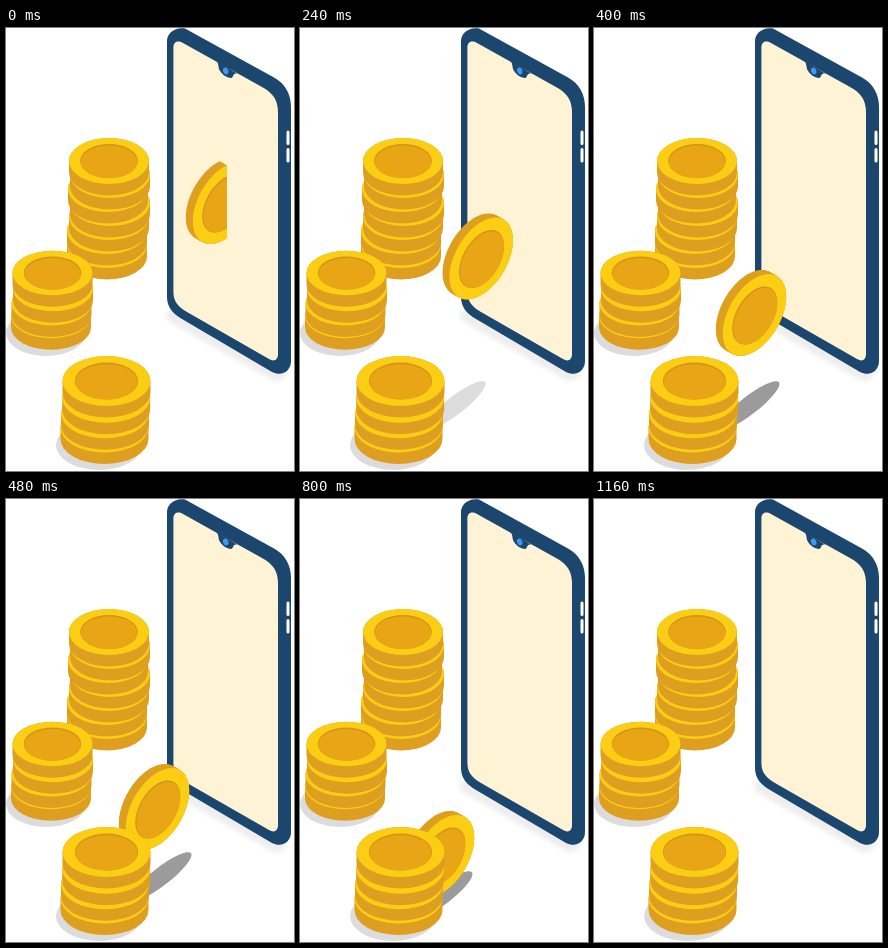
An HTML page with a canvas that plays this animation: 288 px wide and 443 px high, repeating every 2.2 s.

```html
<!DOCTYPE html>
<html lang="en">
<head>
<meta charset="utf-8">
<title>Coins from a phone</title>
<style>
  html, body { margin: 0; width: 100%; height: 100%; overflow: hidden; background: #fff; }
  canvas { display: block; width: 288px; height: 443px; }
</style>
</head>
<body>
<canvas id="stage" width="288" height="443"></canvas>
<script>
const ctx = document.getElementById('stage').getContext('2d');
const W = 288, H = 443, LOOP = 2200, STEP = 40, LAND = 560, END = 1160;
const YELLOW = '#fbce14', SIDE = '#de9f20', INNER = '#e8a516', RIM = '#d3931b';
const NAVY = '#1b466e', CREAM = '#fff3d6';
const SLOT = 221;   // the coin is hidden to the right of this line
const R = 36.6;     // radius of the moving coin

// time, x, y while the coin drops out of the screen
const FALL = [[0, 218.5, 175], [160, 193, 197], [320, 169.5, 264], [480, 151.5, 310], [LAND, 155.5, 343]];

const ramp = (t, a, b) => Math.min(1, Math.max(0, (t - a) / (b - a)));

function coinAt(t) {
  const roll = ramp(t, LAND, 1120) ** 1.3;
  if (roll > 0) return [155.5 - 39 * roll, 343 + 42 * roll];
  let i = 1;
  while (i < FALL.length - 1 && FALL[i][0] < t) i++;
  const [a, ax, ay] = FALL[i - 1], [b, bx, by] = FALL[i];
  const u = ramp(t, a, b);
  return [ax + (bx - ax) * u, ay + (by - ay) * u];
}

function fillPath(d, color) {
  ctx.fillStyle = color;
  ctx.fill(new Path2D(d));
}

function oval(x, y, rx, ry, color, turn = 0) {
  ctx.fillStyle = color;
  ctx.beginPath();
  ctx.ellipse(x, y, rx, ry, turn, 0, Math.PI * 2);
  ctx.fill();
}

function flatCoin(x, y, rx, ry, h) {
  ctx.fillStyle = SIDE;
  ctx.beginPath();
  ctx.ellipse(x, y + h, rx, ry, 0, 0, Math.PI);
  ctx.ellipse(x, y, rx, ry, 0, Math.PI, Math.PI * 2);
  ctx.fill();
  oval(x, y, rx, ry, YELLOW);
}

// shifts run from the top coin down; squeeze tightens the lower gaps
function stack(x, y, rx, ry, pitch, squeeze, shifts) {
  for (let i = shifts.length - 1; i >= 0; i--) {
    flatCoin(x + shifts[i], y + i * pitch - i * i * squeeze, rx, ry, 11.5);
  }
  oval(x, y, rx * 0.72, ry * 0.74, RIM);
  oval(x, y + 0.9, rx * 0.705, ry * 0.71, INNER);
}

// upright disc in isometric view, cut off at the given x
function disc(x, y, r, cut, color) {
  const w = r * 0.866, n = 120;
  const edge = Math.min(cut - x, w);
  if (edge <= -w) return;
  const from = Math.acos(edge / w), span = Math.PI * 2 - 2 * from;
  ctx.fillStyle = color;
  ctx.beginPath();
  for (let i = 0; i <= n; i++) {
    const a = from + span * i / n, dx = w * Math.cos(a);
    ctx.lineTo(x + dx, y - r * Math.sin(a) - dx * 0.577);
  }
  ctx.fill();
}

function movingCoin(x, y) {
  for (let s = 7; s >= 0; s -= 0.5) {
    disc(x - s, y - s * 0.577, R, SLOT - s, SIDE);
  }
  disc(x, y, R, SLOT, YELLOW);
  disc(x + 0.3, y + 0.5, R * 0.71, SLOT, RIM);
  disc(x + 0.8, y + 1.1, R * 0.69, SLOT, INNER);
}

function coinShadow(t) {
  const land = ramp(t, 480, 600), roll = ramp(t, LAND, 1120) ** 2;
  ctx.globalAlpha = 0.42 * ramp(t, 160, 400);
  ctx.filter = 'blur(0.7px)';
  oval(155 - 4.5 * land - 34 * roll, 377.5 + 12.5 * land + 26 * roll, 38 - 16 * roll, 9, '#111', -0.66);
  ctx.filter = 'none';
  ctx.globalAlpha = 1;
}

function phone() {
  ctx.filter = 'blur(2px)';
  fillPath('M160 288Q160 283 166 281L275 334Q283 346 278 350Q272 355 266 352L164 294Q160 291 160 288Z', '#eeeeef');
  ctx.filter = 'none';
  fillPath('M161 13C161 6 168 -1.5 179 0.5L268 49.5C279 55.5 285 66 285 79L285 333C285 343 276 349 266 344L176 291C167 286 161 279 161 269Z', NAVY);
  fillPath('M167.4 20C167.4 14 171 12 177 15L256 59C267 65 272 72 272 84L272 326C272 332 268 334 263 331L181 284C172 279 167.4 273 167.4 264Z', CREAM);
  fillPath('M209 32C213 35 212 37 213 41C215 46 221 50 225 50C228 50 226 44 232 46Z', NAVY);
  oval(219.7, 43, 2.6, 3.5, '#3f97f0', -0.4);
  ctx.strokeStyle = '#fff';
  ctx.lineWidth = 3;
  ctx.lineCap = 'round';
  ctx.beginPath();
  for (const y of [104, 121.5]) {
    ctx.moveTo(282, y);
    ctx.lineTo(282, y + 11.5);
  }
  ctx.stroke();
}

function draw(t) {
  ctx.fillStyle = '#fff';
  ctx.fillRect(0, 0, W, H);
  phone();
  oval(40, 305, 40, 23, '#dcdcdf');
  oval(93, 417, 43, 25, '#dcdcdf');
  stack(103, 133, 40, 23, 14, 0, [0, 1, -1, 1, 0, -2, -2]);
  stack(46.5, 245, 40, 22.3, 16.7, 0.8, [0, 0.5, -1, -1.5]);
  if (t < END) {
    coinShadow(t);
    movingCoin(...coinAt(t));
  }
  stack(100.5, 353, 44, 25, 17.3, 0.6, [0, -0.3, -1.5, -2]);
}

const start = performance.now();
function tick() {
  const t = (performance.now() - start) % LOOP;
  draw(Math.floor(t / STEP) * STEP);
  requestAnimationFrame(tick);
}
tick();
</script>
</body>
</html>
```
